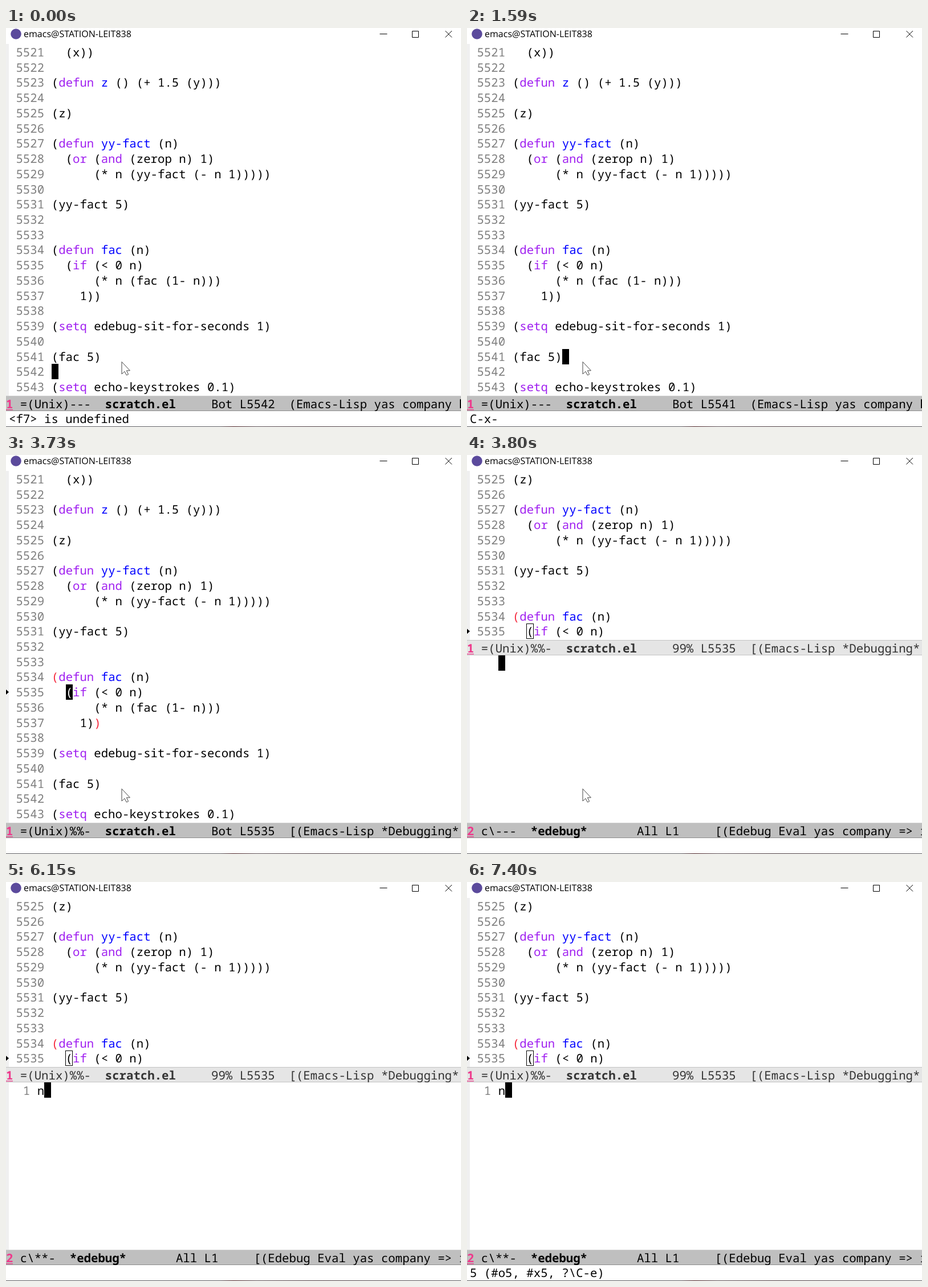
Write an HTML page that moves like this. It is 798 px wide and 701 px high and loops after 8 s.

```html
<!DOCTYPE html>
<html lang="en">
<head>
<meta charset="utf-8">
<title>Debugging session</title>
<style>
  html, body { margin: 0; width: 100%; height: 100%; overflow: hidden; background: #fff; }
  svg { display: block; width: 798px; height: 701px; }
  text {
    font: 20.7px "Noto Sans Mono", "DejaVu Sans Mono", monospace;
    white-space: pre;
    text-rendering: geometricPrecision;
    font-variant-ligatures: none;
  }
  .title { font: 16px "Open Sans", "Noto Sans", sans-serif; }
  .num { fill: #7f7f7f; }
  .kw { fill: #a020f0; }
  .fn { fill: #00f; }
  .hot { fill: #f5253a; }
  .win { fill: #ee3a8c; font-weight: 700; }
  .bold { font-weight: 700; }
  .idle { fill: #333; }
  .inv { fill: #fff; }
  .line { fill: none; stroke: #000; }
</style>
</head>
<body>
<svg viewBox="0 0 798 701">
  <defs>
    <linearGradient id="edge">
      <stop offset="0" stop-color="#5c5c60"/>
      <stop offset=".47" stop-color="#5c5c60"/>
      <stop offset=".5" stop-color="#4a1f22"/>
      <stop offset=".55" stop-color="#5c5054"/>
      <stop offset=".68" stop-color="#4a3a3e"/>
      <stop offset="1" stop-color="#5c5c60"/>
    </linearGradient>
  </defs>
  <circle cx="17.5" cy="10.5" r="9.3" fill="#5b4a9c"/>
  <text class="title" x="31" y="16">emacs@STATION-LEIT838</text>
  <path class="line" d="M655.5 10.5h13M712.5 5.5h11v11h-11zM770.5 5l11.5 11.5M782 5l-11.5 11.5"/>
  <rect y="28" width="5" height="618" fill="#f0f0f0"/>
  <g id="view"></g>
  <rect y="700" width="798" height="1" fill="url(#edge)"/>
</svg>
<script>
const LOOP = 8000;
const CHAR = 12.42, ROW = 26.73, TOP = 28.9, CODE_X = 79.8;
const FIRST = 5521;
const code = `  (x))

(defun z () (+ 1.5 (y)))

(z)

(defun yy-fact (n)
  (or (and (zerop n) 1)
      (* n (yy-fact (- n 1)))))

(yy-fact 5)


(defun fac (n)
  (if (< 0 n)
      (* n (fac (1- n)))
    1))

(setq edebug-sit-for-seconds 1)

(fac 5)

(setq echo-keystrokes 0.1)`.split('\n');

// Each step overrides part of the state from its time onward.
const steps = [
  { at: 0, line: 5542, col: 0, echo: '<f7> is undefined' },
  { at: 620, line: 5541, echo: '' },
  { at: 830, col: 7 },
  { at: 1320, echo: 'C-x-' },
  { at: 2420, line: 5535, col: 2, echo: '', debug: true },
  { at: 2490, hot: true },
  { at: 3800, split: true },
  { at: 5870, typed: true },
  { at: 6910, echo: 'C-x-' },
  { at: 7400, echo: '5 (#o5, #x5, ?\\C-e)' },
];

const esc = s => s.replace(/&/g, '&amp;').replace(/</g, '&lt;').replace(/>/g, '&gt;');
const span = (cls, s) => `<tspan class="${cls}">${s}</tspan>`;
const text = (x, y, s, cls = '') => `<text x="${x}" y="${y}" class="${cls}">${s}</text>`;
const rect = (x, y, w, h, attrs = '') =>
  `<rect x="${x}" y="${y}" width="${w}" height="${h}" ${attrs}/>`;
const block = (x, y) => rect(Math.round(x), Math.round(y), 12, 27);

function highlight(src, line, hot) {
  let s = esc(src)
    .replace(/\(defun (\S+)/, (_, name) => '(defun ' + span('fn', name))
    .replace(/\((defun|setq|or|and|if)\b/g, (_, word) => '(' + span('kw', word));
  if (hot && line === 5534) s = s.replace(/^\(/, span('hot', '('));
  if (hot && line === 5537) s = s.replace(/\)$/, span('hot', ')'));
  return s;
}

function buffer(state) {
  const first = state.split ? 5525 : FIRST;
  const count = state.split ? 11 : code.length;
  let out = '';
  for (let i = 0; i < count; i++) {
    const line = first + i, y = 50 + i * ROW;
    out += text(17.4, y, line, 'num');
    out += text(CODE_X, y, highlight(code[line - FIRST], line, state.hot));
  }

  const row = state.line - first, y = TOP + row * ROW;
  const x = CODE_X + state.col * CHAR;
  if (state.split) {
    out += rect(104.5, Math.round(y) + .5, 12, 26, 'class="line"');
  } else {
    const under = code[state.line - FIRST][state.col] || '';
    out += block(x, y) + text(x, 50 + row * ROW, under, 'inv');
  }
  if (state.debug) out += `<path d="M0 ${y + 9}l5 4.5l-5 4.5z"/>`;
  return out;
}

function modeLine(top, win, flags, name, rest, active) {
  const [fill, edge] = active ? ['#bfbfbf', '#8c8c8c'] : ['#e5e5e5', '#c4c4c4'];
  const label = span('win', win) + ' ' + flags + '  ' + span('bold', name) + rest;
  return rect(0, top, 798, 27, `fill="${fill}"`)
    + rect(0, top, 798, 1, `fill="${active ? '#cfcfcf' : edge}"`)
    + rect(0, top + 26, 798, 1, `fill="${edge}"`)
    + text(0, top + 22, label, active ? '' : 'idle')
    + rect(0, top + 24, 12, 1.3, 'fill="#ee3a8c"');
}

function sourceModeLine(state) {
  const place = state.split ? '99%' : 'Bot';
  const modes = state.debug ? '[(Emacs-Lisp *Debugging*' : '(Emacs-Lisp yas company h';
  return modeLine(state.split ? 325 : 646, 1, state.debug ? '=(Unix)%%-' : '=(Unix)---',
    'scratch.el', `     ${place} L${state.line}  ${modes}`, !state.split);
}

function evalPane(state) {
  return (state.typed ? text(29.8, 374, 1, 'num') + text(54.8, 374, 'n') : '')
    + block(state.typed ? 67 : 55, 352)
    + modeLine(646, 2, state.typed ? 'c\\**-' : 'c\\---', '*edebug*',
      '       All L1     [(Edebug Eval yas company =&gt; i', true);
}

const pointer = '<path d="M203 586.5v21.5l5-4.6l3.4 6.6l3.2-1.5l-3.2-6.6h6z" fill="#fff" stroke="#444"/>';

function render(state) {
  return buffer(state)
    + sourceModeLine(state)
    + (state.split ? evalPane(state) : '')
    + text(5, 694, esc(state.echo))
    + (state.typed ? '' : pointer);
}

const view = document.getElementById('view');
const start = performance.now();
let shown = 0;

function tick() {
  const t = (performance.now() - start) % LOOP;
  const past = steps.filter(step => step.at <= t);
  if (past.length !== shown) {
    shown = past.length;
    view.innerHTML = render(Object.assign({}, ...past));
  }
  requestAnimationFrame(tick);
}
tick();
</script>
</body>
</html>
```
